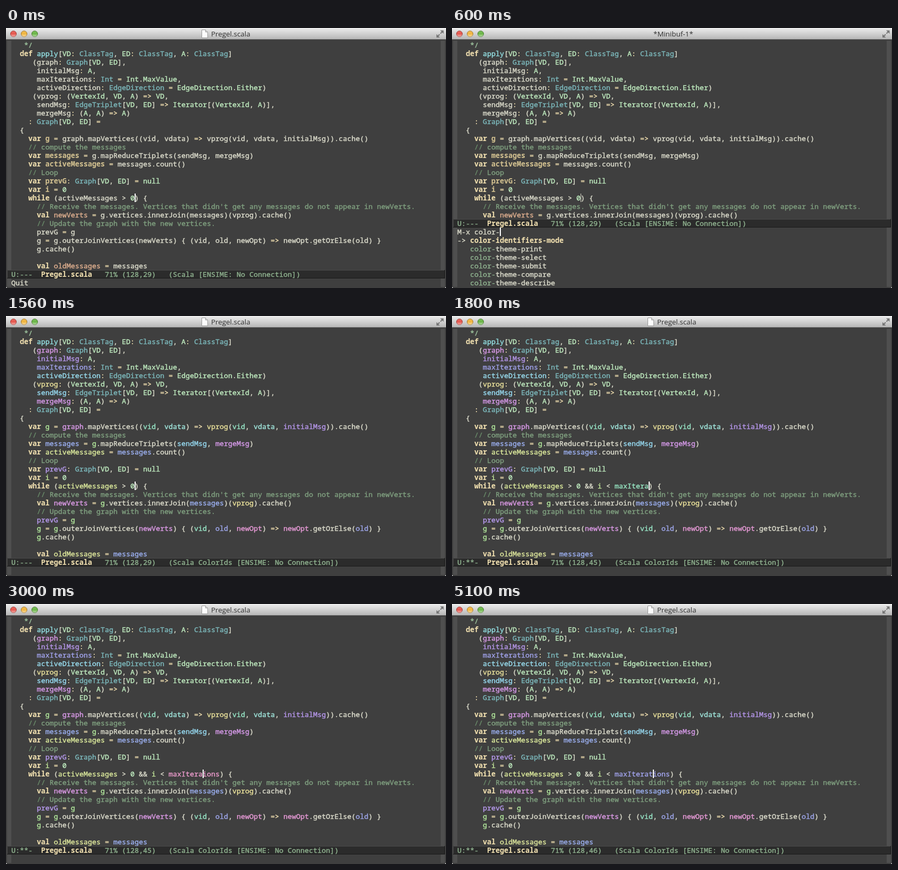
An HTML page that plays this animation: 828 by 490 pixels, repeating every 6100 ms.

```html
<!DOCTYPE html>
<html lang="en">
<head>
<meta charset="utf-8">
<title>Editor</title>
<style>
  html, body { margin: 0; width: 100%; height: 100%; overflow: hidden; background: #3f3f3f; }
  svg { display: block; width: 828px; height: 490px; }
  .mono {
    font: 13.333px "Noto Sans Mono", "DejaVu Sans Mono", monospace;
    color: #dcdccc; fill: currentColor;
  }
  .mono text { stroke: currentColor; stroke-width: .4px; }
  .mono .b { font-weight: 700; stroke-width: .1px; }
  .title { font: 13.4px "Open Sans", "Noto Sans", sans-serif; fill: #303030; }
</style>
</head>
<body>
<svg viewBox="0 0 828 490">
  <defs>
    <linearGradient id="bar" x2="0" y2="1">
      <stop offset="0" stop-color="#ececec"/>
      <stop offset="1" stop-color="#b4b4b4"/>
    </linearGradient>
    <linearGradient id="gloss" x2="0" y2="1">
      <stop offset="0" stop-color="#fff" stop-opacity=".15"/>
      <stop offset=".45" stop-color="#fff" stop-opacity="0"/>
      <stop offset="1" stop-color="#fff" stop-opacity=".5"/>
    </linearGradient>
  </defs>
  <rect width="828" height="490" fill="#3f3f3f"/>
  <path d="M2 24h8v464h-8zM818 24h8v464h-8z" fill="#4f4f4f"/>
  <path d="M0 488V490H2ZM828 488V490H826Z" fill="#fff"/>
  <rect width="828" height="8" fill="#fff"/>
  <path d="M0 22V4Q0 0 4 0H824Q828 0 828 4V22Z" fill="url(#bar)"/>
  <path d="M3 .5H825" stroke="#f6f6f6"/>
  <path d="M0 21.5H828" stroke="#686868"/>
  <g id="lights"></g>
  <g id="page">
    <path d="M368.5 3.5h7l4 4v11h-11z" fill="#fdfdfd" stroke="#999"/>
    <path d="M375.5 3.5v4h4" fill="#ddd" stroke="#999"/>
  </g>
  <path d="M817 4.5H823.5V11ZM810 11.5V18H816.5Z" fill="#777"/>
  <path d="M817.5 10.5L821 7M816 12L812.5 15.5" stroke="#777" stroke-width="2"/>
  <text id="title" class="title" y="15.5"></text>
  <g id="screen" class="mono"></g>
</svg>
<script>
const COL = 8, ROW = 16, LEFT = 10, TOP = 24, BASELINE = 13;
const $ = id => document.getElementById(id);

const CODE = `   */
  def apply[VD: ClassTag, ED: ClassTag, A: ClassTag]
     (graph: Graph[VD, ED],
      initialMsg: A,
      maxIterations: Int = Int.MaxValue,
      activeDirection: EdgeDirection = EdgeDirection.Either)
     (vprog: (VertexId, VD, A) => VD,
      sendMsg: EdgeTriplet[VD, ED] => Iterator[(VertexId, A)],
      mergeMsg: (A, A) => A)
    : Graph[VD, ED] =
  {
    var g = graph.mapVertices((vid, vdata) => vprog(vid, vdata, initialMsg)).cache()
    // compute the messages
    var messages = g.mapReduceTriplets(sendMsg, mergeMsg)
    var activeMessages = messages.count()
    // Loop
    var prevG: Graph[VD, ED] = null
    var i = 0
    while (activeMessages > 0@) {
      // Receive the messages. Vertices that didn't get any messages do not appear in newVerts.
      val newVerts = g.vertices.innerJoin(messages)(vprog).cache()
      // Update the graph with the new vertices.
      prevG = g
      g = g.outerJoinVertices(newVerts) { (vid, old, newOpt) => newOpt.getOrElse(old) }
      g.cache()

      val oldMessages = messages`;

const THEME = {
  keyword: '#f0dfaf', comment: '#7f9f7f', slashes: '#6a8c6a', doc: '#9fc59f', func: '#93e0e3',
  type: '#7cb8bb', constant: '#bfebbf', variable: '#d0bf8f', value: '#dfaf8f', mode: '#8fb28f'
};

const IDS = {
  graph: '#d99ae8', initialMsg: '#b797ec', maxIterations: '#a0a2ea', activeDirection: '#98dcee',
  vprog: '#e9e09a', sendMsg: '#96d9f0', mergeMsg: '#d79aea', g: '#b2e89c', vid: '#98e8c8',
  vdata: '#a0e6dc', messages: '#9aaeee', activeMessages: '#dcea9c', prevG: '#b79aee',
  i: '#c6ea9c', newVerts: '#dc9ae6', old: '#9ea6ea', newOpt: '#e69ad6', oldMessages: '#dfe89c',
  maxItera: '#98e8c4', maxIteraions: '#ea9acb'
};

// Each state: time, loop condition suffix, cursor column
const STATES = [
  { at: 0, extra: '', col: 29, echo: 'Quit' },
  { at: 600, extra: '', col: 29, prompt: true },
  { at: 1200, extra: '', col: 29, ids: true },
  { at: 1800, extra: ' && i < maxItera', col: 45, ids: true },
  { at: 2400, extra: ' && i < maxIteraions', col: 49, ids: true },
  { at: 3000, extra: ' && i < maxIteraions', col: 45, ids: true },
  { at: 3600, extra: ' && i < maxIterations', col: 46, ids: true }
];
const LOOP = 6100, WHILE_ROW = 18;
const CHOICES = ['print', 'select', 'submit', 'compare', 'describe'];

const escapeText = s => s.replace(/&/g, '&amp;').replace(/</g, '&lt;').replace(/>/g, '&gt;');

// Places every word on the character grid
function put(row, col, str, color = '', bold = false) {
  let out = '';
  for (const m of str.matchAll(/\S+/g)) {
    out += `<text x="${LEFT + (col + m.index) * COL}" y="${TOP + row * ROW + BASELINE}"` +
      (color ? ` color="${color}"` : '') + (bold ? ' class="b"' : '') +
      `>${escapeText(m[0])}</text>`;
  }
  return out;
}

function cursor(row, col, width = 2, color = '#fff') {
  return `<rect x="${LEFT + col * COL}" y="${TOP + row * ROW}" width="${width}" height="${ROW}" fill="${color}"/>`;
}

function style(word, before, ids) {
  if (/^(def|var|val|while)$/.test(word)) return [THEME.keyword, true];
  if (/^(:|=|=>)$/.test(word)) return [THEME.keyword];
  if (/^(null|\d+|[A-Z]+)$/.test(word)) return [THEME.constant];
  if (/^[A-Z]/.test(word)) return [/: $/.test(before) ? THEME.type : THEME.constant];
  if (/def $/.test(before)) return [THEME.func];
  if (ids && Object.hasOwn(IDS, word) && !before.endsWith('.')) return [IDS[word]];
  if (/var $/.test(before)) return [THEME.variable, true];
  if (/val $/.test(before)) return [THEME.value];
  return [];
}

function codeLine(line, row, ids) {
  const note = line.match(/^ *(\/\/|\*\/)/);
  if (note) {
    const end = note[0].length, mark = note[1];
    return put(row, end - 2, mark, mark === '//' ? THEME.slashes : THEME.doc) +
      put(row, end, line.slice(end), THEME.comment);
  }
  let out = '';
  for (const m of line.matchAll(/\w+|=>|[:=]|[^\w\s:=]+/g)) {
    out += put(row, m.index, m[0], ...style(m[0], line.slice(0, m.index), ids));
  }
  return out;
}

function modeLine(row, s) {
  const y = TOP + row * ROW;
  const mode = s.ids ? 'Scala ColorIds' : 'Scala';
  return `<rect x="2" y="${y}" width="824" height="16" fill="#2b2b2b"/>` +
    `<path d="M2.5 ${y + 16}V${y + .5}H826" fill="none" stroke="#4a4a4a"/>` +
    `<path d="M2 ${y + 15.5}H825.5V${y}" fill="none" stroke="#191919"/>` +
    put(row, 0, s.extra ? 'U:**-' : 'U:---', THEME.mode) +
    put(row, 7, 'Pregel.scala', THEME.keyword, true) +
    put(row, 22, `71% (128,${s.col})   (${mode} [ENSIME: No Connection])`, THEME.mode);
}

function promptLines() {
  let out = put(22, 0, 'M-x color-') + cursor(22, 10) +
    put(23, 0, '->') + put(23, 3, 'color-identifiers-mode', THEME.keyword, true);
  CHOICES.forEach((name, k) => {
    out += put(24 + k, 3, 'color-', THEME.mode) + put(24 + k, 9, 'theme-' + name);
  });
  return out;
}

function draw(s) {
  const rows = s.prompt ? 21 : 27;
  const lines = CODE.replace('@', () => s.extra).split('\n').slice(0, rows);
  $('screen').innerHTML = lines.map((line, row) => codeLine(line, row, s.ids)).join('') +
    (s.prompt ? cursor(WHILE_ROW, s.col, 1, '#dcdccc') : cursor(WHILE_ROW, s.col)) +
    modeLine(rows, s) +
    (s.prompt ? promptLines() : put(28, 0, s.echo || ''));
  $('title').textContent = s.prompt ? '*Minibuf-1*' : 'Pregel.scala';
  $('title').setAttribute('x', s.prompt ? 379 : 386);
  $('page').style.display = s.prompt ? 'none' : '';
}

$('lights').innerHTML = [['#e5554c', '#9c3a35'], ['#f0b43c', '#a0762a'], ['#69b545', '#47792f']]
  .map(([fill, edge], k) => {
    const ring = `<circle cx="${14 + 20 * k}" cy="11" r="5.5"`;
    return `${ring} fill="${fill}" stroke="${edge}"/>${ring} fill="url(#gloss)"/>`;
  }).join('');

let shown = null;
const start = performance.now();
function tick() {
  const t = Math.max(0, performance.now() - start) % LOOP;
  const state = STATES.findLast(s => s.at <= t);
  if (state !== shown) draw(shown = state);
  requestAnimationFrame(tick);
}
tick();
</script>
</body>
</html>
```
